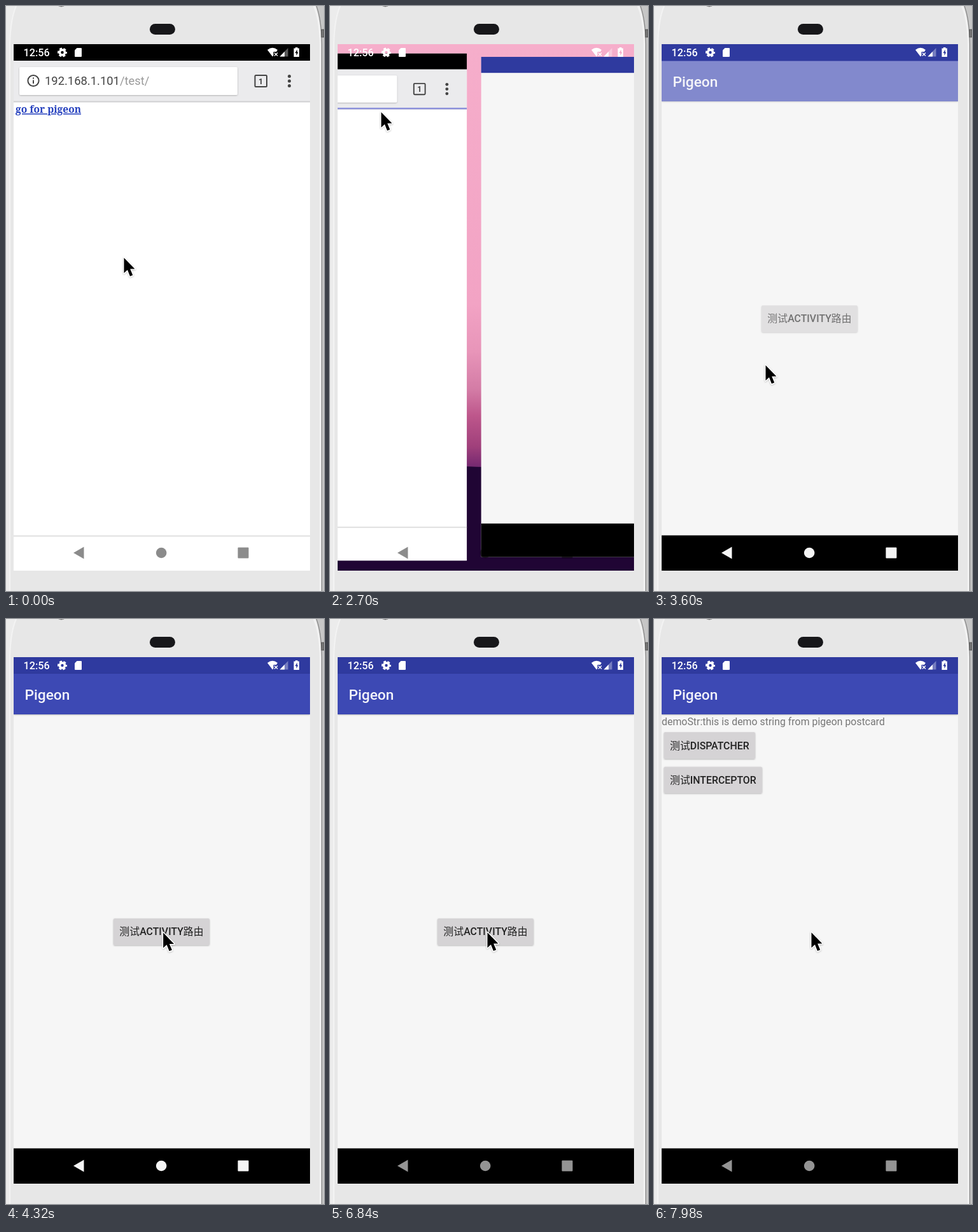
Recreate the animation shown at these times as an HTML page. Size 500 px wide and 920 px high, loop 8 s.

```html
<!DOCTYPE html>
<html lang="en">
<head>
<meta charset="utf-8">
<title>Phone demo</title>
<style>
  html, body { margin: 0; width: 100%; height: 100%; overflow: hidden; background: #e7e7e7; }
  svg { display: block; width: 100vw; height: 100vh; }
  text { font-family: Roboto, "Noto Sans CJK SC", "Noto Sans CJK", sans-serif; white-space: pre; }
  .title { font-size: 22.7px; font-weight: 500; fill: #f4f4fa; }
  .label { font-size: 15.9px; font-weight: 500; fill: #222; }
  .cjk { font-weight: 400; }
</style>
</head>
<body>
<svg viewBox="0 0 500 920">
  <defs>
    <clipPath id="screen"><rect x="12" y="60" width="466" height="828"/></clipPath>
    <clipPath id="reveal"><rect id="revealBox" x="12" y="60" width="466" height="828"/></clipPath>
    <clipPath id="buttonShape"><rect x="169" y="471" width="151" height="42" rx="2"/></clipPath>
    <linearGradient id="sky" gradientUnits="userSpaceOnUse" x1="0" y1="60" x2="0" y2="740">
      <stop offset="0" stop-color="#f6aecb"/>
      <stop offset=".6" stop-color="#f2a3c4"/>
      <stop offset=".71" stop-color="#e895b9"/>
      <stop offset=".8" stop-color="#d37ba5"/>
      <stop offset=".86" stop-color="#bd568b"/>
      <stop offset=".93" stop-color="#a0407b"/>
      <stop offset=".97" stop-color="#7c2c72"/>
      <stop offset="1" stop-color="#5e256c"/>
    </linearGradient>
    <filter id="soft" x="-20%" y="-20%" width="140%" height="150%">
      <feDropShadow dx="0" dy=".8" stdDeviation=".9" flood-opacity=".28"/>
    </filter>
  </defs>

  <!-- phone body -->
  <rect width="500" height="920" fill="#ececec"/>
  <path d="M6 920V60Q7 20 16 0H484Q493 20 494 60V920Z" fill="#e7e7e7"/>
  <path d="M6 920V60Q7 20 16 0M494 920V60Q493 20 484 0" fill="none" stroke="#f3f3f3" stroke-width="2"/>
  <path d="M488 0Q496 22 496.5 60V920H500V0Z" fill="#c6c6c6"/>
  <path d="M488 0Q496 22 496.5 60V920" fill="none" stroke="#858585" stroke-width="1.3"/>
  <rect x="496" y="37" width="4" height="12" fill="#777" stroke="#444" stroke-width=".8"/>
  <circle cx="87" cy="-8" r="9" fill="#333" stroke="#999"/>
  <rect x="226" y="28" width="40" height="17" rx="8.5" fill="#17171a"/>

  <g clip-path="url(#screen)">
    <rect x="12" y="60" width="466" height="828" fill="url(#sky)"/>
    <path d="M12 739Q60 727 140 724T478 738V888H12Z" fill="#200534"/>

    <g id="browser">
      <rect x="12" y="60" width="466" height="828" fill="#fff"/>
      <rect x="12" y="60" width="466" height="26"/>
      <rect x="12" y="86" width="466" height="64" fill="#ebebed"/>
      <rect x="12" y="149.5" width="466" height="2" fill="#d0d0d2"/>
      <rect id="loadBar" x="12" y="148.5" width="466" height="2.5" fill="#8c91dc"/>
      <rect x="21" y="96" width="343" height="44" rx="2" fill="#fff" filter="url(#soft)"/>
      <g fill="none" stroke="#444" stroke-width="2">
        <circle cx="43" cy="117.5" r="8.6"/>
        <path d="M43 116.5V122M43 112.5V114.5"/>
        <rect x="391.5" y="109" width="18.5" height="18" rx="1.5"/>
      </g>
      <text x="61" y="124.3" font-size="18.4" fill="#444">192.168.1.101<tspan fill="#999">/test/</tspan></text>
      <text x="400.7" y="122.5" font-size="12.5" font-weight="700" fill="#444" text-anchor="middle">1</text>
      <g fill="#444"><circle cx="445.5" cy="110.5" r="2.5"/><circle cx="445.5" cy="118" r="2.5"/><circle cx="445.5" cy="125.5" r="2.5"/></g>
      <text x="15" y="168" style="font:700 15.5px 'Noto Serif',serif;text-decoration:underline" fill="#2641be">go for pigeon</text>
      <rect x="12" y="832.5" width="466" height="2" fill="#dfdfdf"/>
    </g>

    <g id="home">
      <rect x="12" y="60" width="466" height="828" fill="#f6f6f6"/>
      <rect x="12" y="60" width="466" height="26.5" fill="#2f3a9f"/>
      <rect x="12" y="832.5" width="466" height="55.5"/>
      <g id="homeContent">
        <rect x="12" y="86" width="466" height="64" fill="#3c48b4" filter="url(#soft)"/>
        <text class="title" x="29.5" y="127">Pigeon</text>
        <rect x="169" y="471" width="151" height="42" rx="2" fill="#d5d3d5" filter="url(#soft)"/>
        <circle id="ripple" cx="245" cy="492" r="0" clip-path="url(#buttonShape)"/>
        <text class="label" x="244.5" y="497.2" text-anchor="middle"><tspan class="cjk">测试</tspan>ACTIVITY<tspan class="cjk">路由</tspan></text>
      </g>
      <rect id="scrim" x="12" y="60" width="466" height="828" opacity="0"/>
    </g>

    <g id="detail">
      <g clip-path="url(#reveal)">
        <rect x="12" y="60" width="466" height="828" fill="#f6f6f6"/>
        <rect x="12" y="60" width="466" height="26.5" fill="#2f3a9f"/>
        <rect x="12" y="832.5" width="466" height="55.5"/>
        <rect x="12" y="86" width="466" height="64" fill="#3c48b4" filter="url(#soft)"/>
        <text class="title" x="29.5" y="127">Pigeon</text>
        <text x="12" y="167" font-size="15.9" fill="#777">demoStr:this is demo string from pigeon postcard</text>
        <g fill="#d5d3d5" filter="url(#soft)">
          <rect x="15.5" y="178" width="143.5" height="42" rx="2"/>
          <rect x="15.5" y="232.5" width="154.5" height="41.5" rx="2"/>
        </g>
        <text class="label" x="25" y="205"><tspan class="cjk">测试</tspan>DISPATCHER</text>
        <text class="label" x="25" y="259"><tspan class="cjk">测试</tspan>INTERCEPTOR</text>
      </g>
    </g>

    <!-- system icons -->
    <g fill="#fff">
      <text x="27.5" y="79" font-size="16.2" font-weight="500">12:56</text>
      <circle cx="88.5" cy="73" r="4" fill="none" stroke="#fff" stroke-width="3.6"/>
      <circle cx="88.5" cy="73" r="6.2" fill="none" stroke="#fff" stroke-width="2.6" stroke-dasharray="3.9 2.593" stroke-dashoffset="1.95"/>
      <path d="M111.5 66H118Q119 66 119 67V79Q119 80 118 80H109Q108 80 108 79V69.5Z"/>
      <path d="M411 69Q419 62.5 427 69L425 72H420.5V78L419 79.5Z"/>
      <path d="M422 73.5L427 78.5M427 73.5L422 78.5" stroke="#fff" stroke-width="1.4"/>
      <path d="M430.5 79.5L443.5 66V79.5Z" opacity=".35"/>
      <path d="M430.5 79.5L438 71.8V79.5Z"/>
      <path fill-rule="evenodd" d="M455 65H458.5V66.5H461V80H452.5V66.5H455ZM457.8 68.5L454.5 74H456.5V78L459.5 72.5H457.8Z"/>
    </g>
    <g id="nav">
      <path d="M106 860L122.5 850.5V869.5Z"/>
      <circle cx="244.2" cy="860" r="8.3"/>
      <rect x="364.5" y="851.5" width="17" height="17" rx="1"/>
    </g>
  </g>

  <g id="cursor" filter="url(#soft)">
    <path d="M.5 2V26L6 21L10 31L14.3 29.2L10.2 19.6H17.5Z" stroke="#fff" stroke-width="3" paint-order="stroke" stroke-linejoin="round"/>
  </g>
</svg>
<script>
const LOOP = 8000, CENTER_X = 245, PIVOT_Y = 460, WIDTH = 466, HEIGHT = 828, SMALL = .95;
const TASK_START = 2568, OPEN_START = 7433;
const parts = Object.fromEntries([...document.querySelectorAll('svg [id]')].map(el => [el.id, el]));
const set = (id, attrs) => { for (const key in attrs) parts[id].setAttribute(key, attrs[key]); };
const phase = (t, start, length) => Math.min(1, Math.max(0, (t - start) / length));
const mix = (a, b, k) => a + (b - a) * k;

function bezier(x1, y1, x2, y2) {
  const at = (a, b, u) => 3 * (1 - u) ** 2 * u * a + 3 * (1 - u) * u * u * b + u ** 3;
  return x => {
    if (x <= 0 || x >= 1) return x <= 0 ? 0 : 1;
    let low = 0, high = 1;
    for (let i = 0; i < 24; i++) {
      const mid = (low + high) / 2;
      if (at(x1, x2, mid) < x) low = mid; else high = mid;
    }
    return at(y1, y2, low);
  };
}
const standard = bezier(.4, 0, .2, 1);
const aggressive = bezier(.2, 0, 0, 1);
const smooth = bezier(.4, 0, .5, 1);
const burst = bezier(.3, 0, .8, .15), settle = bezier(.05, .7, .1, 1);
const extraSlow = x => x < 1 / 6 ? .4 * burst(x * 6) : .4 + .6 * settle((x - 1 / 6) * 1.2);

// Each move: start, duration, destination of the pointer tip.
const moves = [[500, 1000, 80, 165], [3160, 440, 175, 563], [3660, 700, 247, 491]];
function pointer(t) {
  let x = 185, y = 394;
  for (const [start, length, toX, toY] of moves) {
    const k = smooth(phase(t, start, length));
    x = mix(x, toX, k);
    y = mix(y, toY, k);
  }
  return `translate(${x} ${y})`;
}

const scaled = (shift, scale) =>
  `translate(${CENTER_X + shift * WIDTH * scale} ${PIVOT_Y}) scale(${scale}) translate(${-CENTER_X} ${-PIVOT_Y})`;
const shiftedY = y => `translate(0 ${Math.round(y)})`;

function render(t) {
  // Task switch: shrink, slide sideways, grow back.
  const slide = aggressive(phase(t, TASK_START + 50, 383));
  const shrink = standard(phase(t, TASK_START, 283));
  const grow = standard(phase(t, TASK_START + 283, 317));
  set('browser', { transform: scaled(-1.05 * slide, mix(1, SMALL, shrink)) });
  set('loadBar', { opacity: t > 2400 ? 1 : 0 });
  set('homeContent', { opacity: phase(t, 3540, 97) });

  // Button press.
  set('ripple', {
    r: 80 * phase(t, 5405, 185),
    opacity: .07 * (1 - phase(t, 5650, 300))
  });

  // Detail page rises and is uncovered from below.
  const k = phase(t, OPEN_START, 425), rise = standard(k);
  const top = .959 * HEIGHT * (1 - extraSlow(k));
  set('detail', {
    display: t < OPEN_START ? 'none' : 'inline',
    transform: shiftedY(.041 * HEIGHT * (1 - rise))
  });
  set('revealBox', { y: 60 + top, height: HEIGHT - top });
  set('scrim', { opacity: .075 * phase(t, OPEN_START, 65) });
  set('home', {
    display: t < TASK_START ? 'none' : 'inline',
    transform: t < OPEN_START
      ? scaled(1.05 * (1 - slide), mix(SMALL, 1, grow))
      : shiftedY(-.02 * HEIGHT * rise)
  });

  // Navigation icons: dark on the page, bright on black, then dimmed.
  const light = t > 3160;
  set('nav', {
    fill: light ? '#fff' : '#000',
    opacity: light ? mix(phase(t, 3160, 120) * .96, .58, phase(t, 4800, 600)) : .45
  });
  set('cursor', { transform: pointer(t) });
}

const begin = performance.now();
function tick() {
  render((performance.now() - begin) % LOOP);
  requestAnimationFrame(tick);
}
tick();
</script>
</body>
</html>
```
